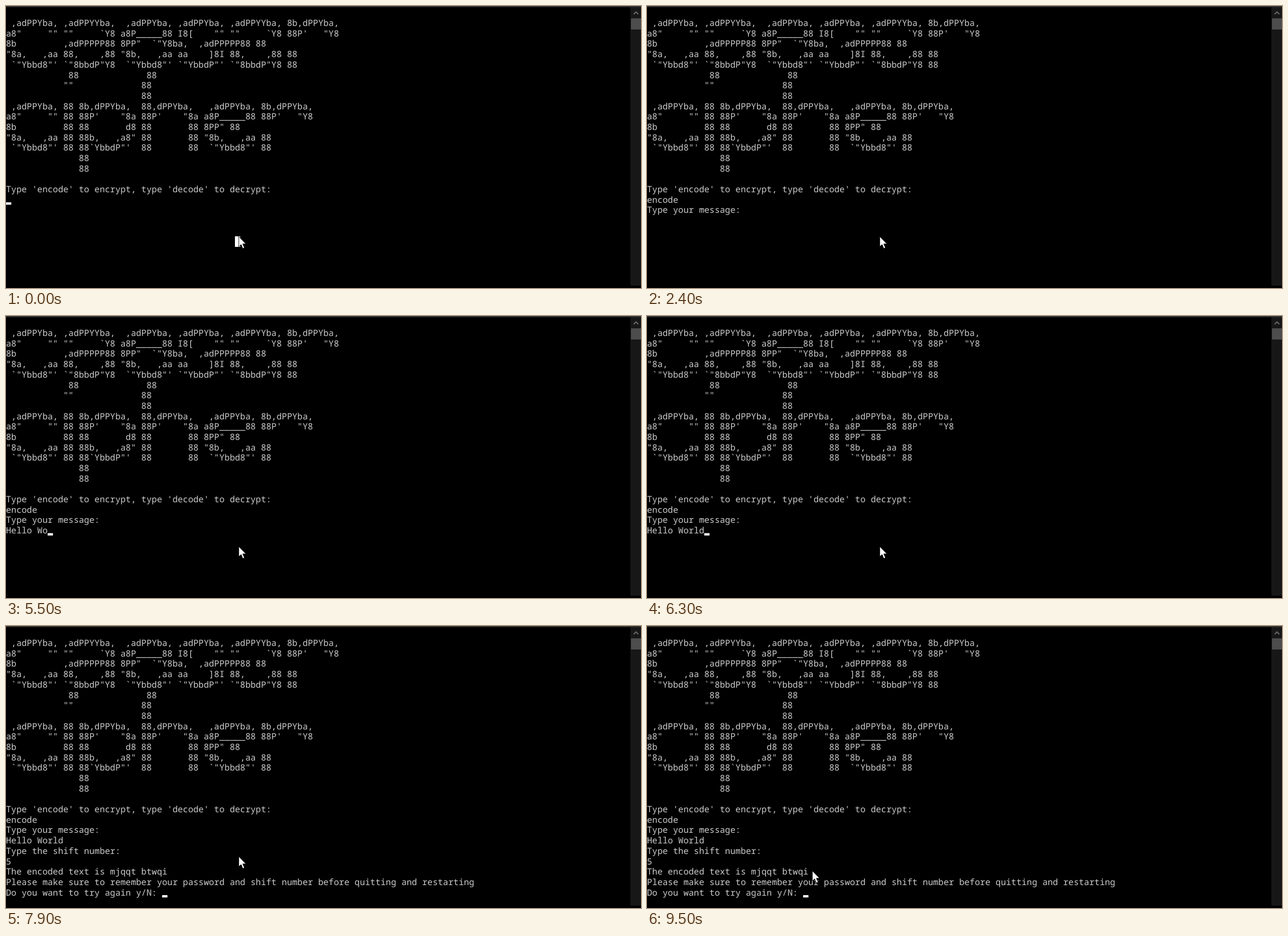
Recreate the animation shown at these times as an HTML page. Size 1079 by 480 pixels, loop 9600 ms.

```html
<!DOCTYPE html>
<html lang="en">
<head>
<meta charset="utf-8">
<title>Cipher console</title>
<style>
  :root { --col: 8.844px; --row: 17.69px; }
  html, body { margin: 0; width: 100%; height: 100%; overflow: hidden; background: #000; }
  body { position: relative; }
  body > * { position: absolute; }
  #edge { left: 0; top: 0; width: 100%; height: 2px; background: #333; }
  #screen {
    margin: 0; left: 0; top: 3.4px; color: #ccc;
    font: 14.74px/var(--row) "Noto Sans Mono", "DejaVu Sans Mono", monospace;
    text-rendering: geometricPrecision; font-variant-ligatures: none;
  }
  #caret { left: 0; top: 0; width: var(--col); height: 4.4px; background: #fff; }
  #mark { left: 389px; top: 392px; width: 8.6px; height: 17.6px; background: #fff; }
  #bar { left: 1061px; top: 2px; width: 18px; height: 474px; background: #171717; }
  #thumb { left: 1062px; top: 21px; width: 17px; height: 19px; background: #4d4d4d; }
  #chevron { left: 1065px; top: 8px; }
  #pointer { left: 0; top: 0; overflow: visible; }
</style>
</head>
<body>
<div id="edge"></div>
<pre id="screen">

 ,adPPYba, ,adPPYYba,  ,adPPYba, ,adPPYba, ,adPPYYba, 8b,dPPYba,
a8"     "" ""     `Y8 a8P_____88 I8[    "" ""     `Y8 88P'   "Y8
8b         ,adPPPPP88 8PP"  `"Y8ba,  ,adPPPPP88 88
"8a,   ,aa 88,    ,88 "8b,   ,aa aa    ]8I 88,    ,88 88
 `"Ybbd8"' `"8bbdP"Y8  `"Ybbd8"' `"YbbdP"' `"8bbdP"Y8 88
            88             88
           ""             88
                          88
 ,adPPYba, 88 8b,dPPYba,  88,dPPYba,   ,adPPYba, 8b,dPPYba,
a8"     "" 88 88P'    "8a 88P'    "8a a8P_____88 88P'   "Y8
8b         88 88       d8 88       88 8PP" 88
"8a,   ,aa 88 88b,   ,a8" 88       88 "8b,   ,aa 88
 `"Ybbd8"' 88 88`YbbdP"'  88       88  `"Ybbd8"' 88
              88
              88

Type 'encode' to encrypt, type 'decode' to decrypt:
<span id="session"></span></pre>
<div id="caret"></div>
<div id="mark"></div>
<div id="bar"></div>
<div id="thumb"></div>
<svg id="chevron" width="11" height="8"><path d="M1.5 6 5.5 2 9.5 6" fill="none" stroke="#686868" stroke-width="1.8"/></svg>
<svg id="pointer" width="14" height="22"><path d="M0 0V17.2L3.9 13.6 6.8 20.4 9.6 19.2 6.7 12.5H12Z" fill="#fff" stroke="#000" stroke-width=".8"/></svg>
<script>
const LOOP = 9600, STEP = 100;
const COL = 8.844, ROW = 17.69, TOP = 3, FIRST_ROW = 18;
const MARK_END = 300;

// [time, text written to the console]
const writes = [
  [400, 'e'], [600, 'n'], [800, 'c'], [1000, 'o'], [1100, 'd'], [1300, 'e'],
  [1700, '\nType your message:\n'],
  [3300, 'H'], [3500, 'e'], [3800, 'l'], [4200, 'l'], [4500, 'o'],
  [4900, ' '], [5100, 'W'], [5400, 'o'], [5800, 'r'], [6000, 'l'], [6200, 'd'],
  [6500, '\nType the shift number:\n'],
  [7700, '5'],
  [7800, '\nThe encoded text is mjqqt btwqi' +
    '\nPlease make sure to remember your password and shift number before quitting and restarting' +
    '\nDo you want to try again y/N: ']
];
const caretOff = [[2200, 2700], [6500, 6900], [7400, 7700], [8400, 9000]];
const move = { start: 8600, end: 9400, from: [395.6, 392.4], to: [281, 416.8] };

const byId = id => document.getElementById(id);
const session = byId('session'), caret = byId('caret'), mark = byId('mark'), pointer = byId('pointer');
const place = (el, x, y) => { el.style.transform = `translate(${x}px, ${y}px)`; };
const show = (el, on) => { el.style.visibility = on ? 'visible' : 'hidden'; };
const smooth = p => p * p * (3 - 2 * p);

function render(t) {
  const text = writes.filter(w => w[0] <= t).map(w => w[1]).join('');
  if (session.textContent !== text) session.textContent = text;

  const lines = text.split('\n');
  const row = FIRST_ROW + lines.length - 1;
  place(caret, lines.at(-1).length * COL, TOP + row * ROW + 12.8);
  show(caret, !caretOff.some(([a, b]) => t >= a && t < b));
  show(mark, t < MARK_END);

  const p = smooth(Math.min(1, Math.max(0, (t - move.start) / (move.end - move.start))));
  place(pointer, ...move.from.map((v, i) => v + (move.to[i] - v) * p));
}

function tick() {
  const t = performance.now() % LOOP;
  render(Math.floor(t / STEP) * STEP);
  requestAnimationFrame(tick);
}
tick();
</script>
</body>
</html>
```
